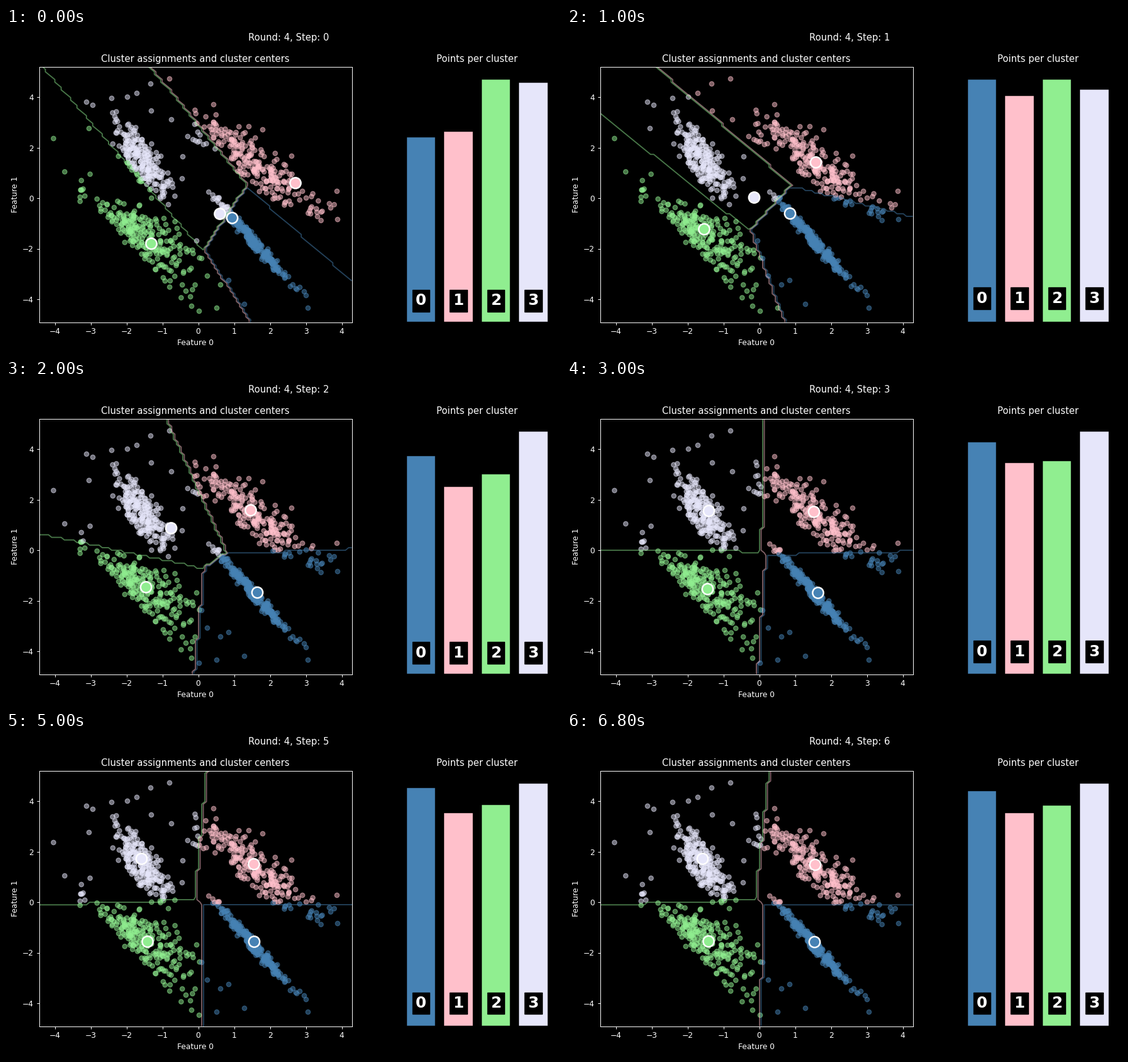
Write a matplotlib script that moves like this. It is 882 px wide and 516 px high and loops after 7000 ms.

```python
import numpy as np
import matplotlib.pyplot as plt
from matplotlib.animation import FuncAnimation

W, H, DPI = 882, 516, 96
K = 88.2 / DPI                      # scale from design points to figure points
STEPS, HOLD, INTERVAL = 7, 5, 200   # each step stays for HOLD ticks
COLORS = np.array(["steelblue", "pink", "lightgreen", "lavender"])

LEFT, RIGHT, TOP, BOTTOM = 52.5, 549.5, 61.5, 468.5
ORIGIN, UNIT = np.array([305.5, 271.0]), np.array([57.0, -40.25])


def to_data(px):
    """Stage pixels to plot coordinates."""
    return (np.asarray(px, float) - ORIGIN) / UNIT


def rect(x0, x1):
    return [x0 / W, 1 - BOTTOM / H, (x1 - x0) / W, (BOTTOM - TOP) / H]


# Cluster centers per step, in stage pixels.
CENTERS = to_data([
    [(359.5, 302.5), (460, 247), (231, 343.5), (340, 296)],
    [(354.5, 295.5), (395.5, 214), (218, 320.5), (297.5, 270)],
    [(399.5, 338.5), (389, 207.5), (222.5, 330), (262.5, 236)],
    [(399, 339), (392.5, 210), (223.5, 333), (225.5, 208.5)],
    [(395.5, 334.5), (393.5, 210.5), (225, 334), (217, 203.5)],
    [(394.5, 334), (394, 210.5), (225, 334), (215.5, 202)],
    [(393.5, 334.5), (394.5, 211.5), (225, 333.5), (215.5, 202)],
])
COUNTS = [
    (216, 222, 283, 279), (257, 240, 257, 246), (257, 221, 236, 286),
    (258, 235, 237, 270), (261, 232, 242, 265), (260, 233, 242, 265),
    (258, 234, 242, 266),
]

# Size, mean x, mean y, x spread, slope, spread around the line, flare.
BLOBS = [
    (246, 390, 336, 32, 1.126, 6.5, 0),
    (220, 393, 211, 43, 0.72, 19, 0),
    (225, 226, 335, 37, 0.68, 23, 0.3),
    (235, 216, 210, 24, 1.1, 21, 0),
    (14, 499, 284, 18, 0.3, 12, 0),
    (11, 122, 253, 15, 0.3, 14, 0),
    (8, 300, 180, 10, 0.3, 9, 0),
]
STRAGGLERS = [
    (480, 446), (477, 426), (474, 420), (467, 413), (75.5, 176), (132, 160),
    (128, 118), (138, 123), (168, 112), (193, 110), (208, 104), (230, 89),
    (260, 81), (231, 132), (263, 146), (307, 451), (295, 443), (335, 446),
    (341, 409), (354, 402), (379, 440), (320, 395), (311, 367), (286, 419),
    (330, 122), (386, 157), (408, 162), (454, 204), (526, 260), (527, 305),
    (281, 205), (280, 240), (303, 339),
]


def blob(rng, size, mx, my, sx, slope, spread, flare):
    u, v = rng.normal(size=(2, 2 * size))
    keep = np.flatnonzero(u**2 + v**2 < 5.3)[:size]
    u, v = u[keep], v[keep]
    y = my + slope * sx * u + spread * (1 + flare * u) * v
    return np.column_stack([mx + sx * u, y])


def make_points(seed=4):
    rng = np.random.default_rng(seed)
    parts = [blob(rng, *spec) for spec in BLOBS]
    return to_data(rng.permutation(np.vstack(parts + [STRAGGLERS])))


def nearest(points, centers):
    gaps = points[..., None, :] - centers
    return (gaps**2).sum(-1).argmin(-1)


plt.style.use("dark_background")
plt.rcParams.update({
    "font.family": "DejaVu Sans",
    "font.size": 10 * K,
    "lines.linewidth": 1.5 * K,
    "lines.markersize": 6 * K,
    "axes.linewidth": 0.8 * K,
    "axes.titlepad": 6 * K,
    "axes.labelpad": 4 * K,
})
for axis in ("xtick", "ytick"):
    plt.rcParams.update({f"{axis}.major.size": 3.5 * K,
                         f"{axis}.major.pad": 3.5 * K,
                         f"{axis}.major.width": 0.8 * K})

fig = plt.figure(figsize=(W / DPI, H / DPI), dpi=DPI)
heading = fig.text(449.5 / W, 1 - 20 / H, "", fontsize=12 * K, ha="center")

# Scatter plot with decision boundaries
points = make_points()
(x0, y0), (x1, y1) = to_data([(LEFT, BOTTOM), (RIGHT, TOP)])
ax = fig.add_axes(rect(LEFT, RIGHT), xlim=(x0, x1), ylim=(y0, y1),
                  xlabel="Feature 0", ylabel="Feature 1",
                  title="Cluster assignments and cluster centers")
ax.set_xticks(range(-4, 5))
ax.set_yticks(range(-4, 5, 2))

gx, gy = np.meshgrid(np.linspace(x0, x1, 100), np.linspace(y0, y1, 100))
grid = np.stack([gx, gy], axis=-1)
dots = ax.scatter(*points.T, alpha=0.5)
borders = [ax.contour(gx, gy, nearest(grid, c), levels=range(4),
                      colors=list(COLORS), alpha=0.5) for c in CENTERS]
marks = ax.scatter(*CENTERS[0].T, s=200 * K**2, c=COLORS, edgecolors="white",
                   linewidths=2 * K, zorder=3)
ax.set(xlim=(x0, x1), ylim=(y0, y1))

# Bar chart
bar_ax = fig.add_axes(rect(624.3, 873.3), xlim=(-0.59, 3.59),
                      title="Points per cluster")
bar_ax.axis("off")
bars = bar_ax.bar(range(4), COUNTS[0], color=COLORS, edgecolor="black",
                  linewidth=2 * K)
for k in range(4):
    bar_ax.text(k, 25, str(k), fontsize=20 * K, weight="bold", ha="center",
                va="center", bbox=dict(color="black"))


def draw(tick):
    step = tick // HOLD
    heading.set_text(f"Round: 4, Step: {step}")
    dots.set_color(COLORS[nearest(points, CENTERS[step])])
    marks.set_offsets(CENTERS[step])
    for k, border in enumerate(borders):
        border.set_visible(k == step)
    for bar, count in zip(bars, COUNTS[step]):
        bar.set_height(count)
    bar_ax.set_ylim(0, max(COUNTS[step]) * 1.05)
    return []


anim = FuncAnimation(fig, draw, frames=STEPS * HOLD, interval=INTERVAL,
                     repeat=True, blit=False)
plt.show()
```
